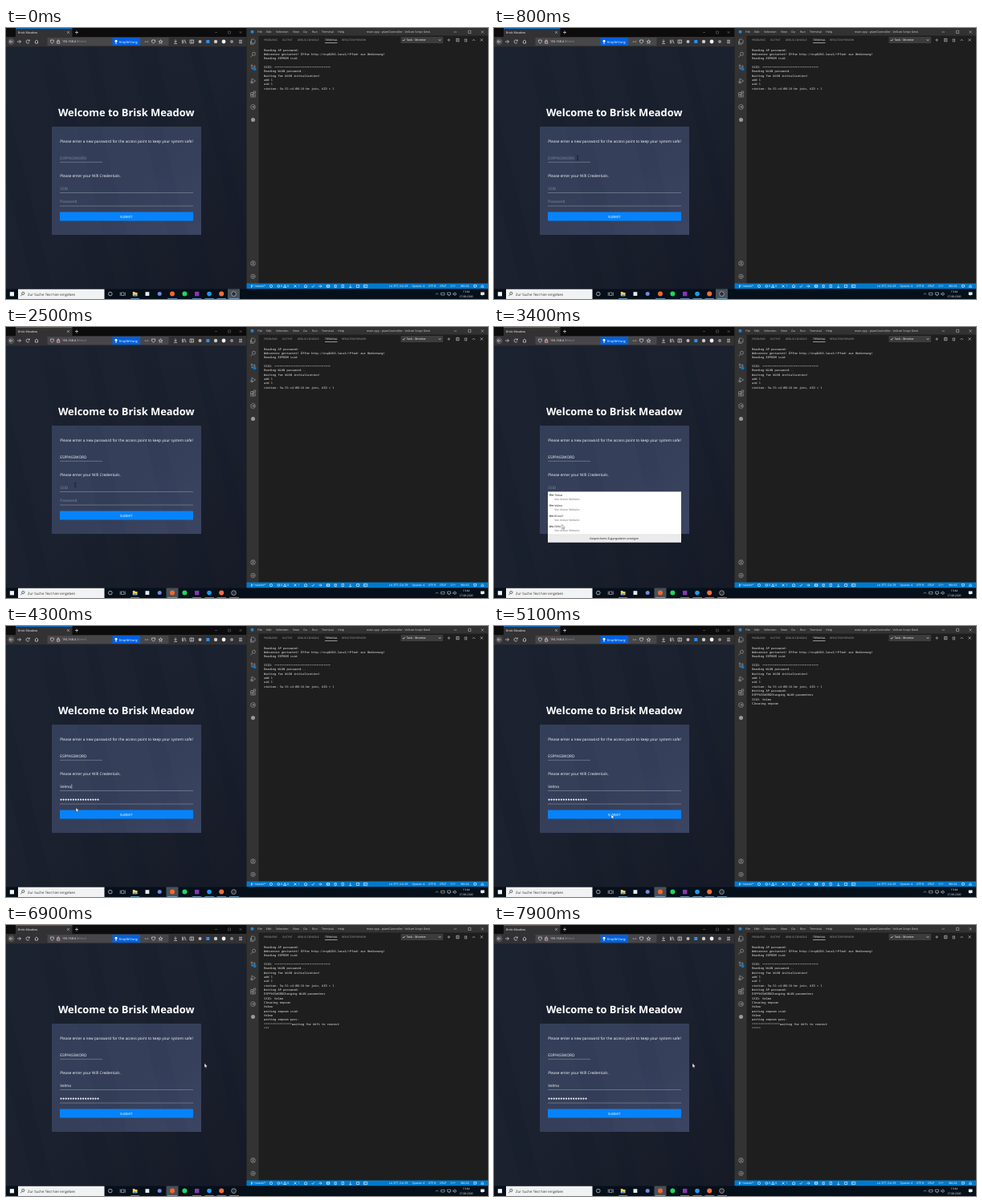
Animation of 600x338 px, one loop 8000 ms. Source, as an HTML page:

```html
<!DOCTYPE html>
<html lang="de">
<head>
<meta charset="utf-8">
<title>Brisk Meadow</title>
<style>
html, body { margin: 0; width: 100%; height: 100%; overflow: hidden; background: #1e1e1e; }
svg { display: block; width: 600px; height: 338px; }
text { font-family: 'Open Sans', 'Noto Sans', sans-serif; text-rendering: geometricPrecision; white-space: pre; }
.mid { text-anchor: middle; }
.form { font-size: 4.73px; fill: #fff; }
.hint { fill: #858da0; }
.menu { font-size: 3.65px; fill: #d2d2d2; }
.tabs { font-size: 3.25px; fill: #a8a8a8; }
.stat { font-size: 3.6px; fill: #fff; }
.list { font-size: 3.5px; fill: #111; }
.list .sub { fill: #666; }
.term text { font: 500 3.65px 'Noto Sans Mono', 'DejaVu Sans Mono', monospace; fill: #ececec; }
.line { fill: none; stroke: #c8c8cc; stroke-width: .8; }

.step { animation: 8s step-end infinite; }
.idle { animation-name: idle; }
.focus { animation-name: focus; }
.pick { animation-name: pick; }
.empty { animation-name: empty; }
.filled { animation-name: filled; }
.logins { animation-name: logins; }
.blank { animation-name: blank; }
.known { animation-name: known; }
.caret { animation-name: caret; }
.log1 { animation-name: log1; }
.log2 { animation-name: log2; }
.cover { animation-name: cover; }
.arrow { animation-name: arrow; }
.beam { animation-name: beam; }
.pointer { animation: move 8s ease-in-out infinite; }

@keyframes idle { 0% { opacity: 1 } 15%, 100% { opacity: 0 } }
@keyframes focus { 0% { opacity: 0 } 15%, 100% { opacity: 1 } }
@keyframes pick { 0% { opacity: 0 } 18.75% { opacity: 1 } 26.25%, 100% { opacity: 0 } }
@keyframes empty { 0% { opacity: 1 } 26.25%, 100% { opacity: 0 } }
@keyframes filled { 0% { opacity: 0 } 26.25%, 100% { opacity: 1 } }
@keyframes logins { 0% { opacity: 0 } 33.75% { opacity: 1 } 48.75%, 100% { opacity: 0 } }
@keyframes blank { 0% { opacity: 1 } 48.75%, 100% { opacity: 0 } }
@keyframes known { 0% { opacity: 0 } 48.75%, 100% { opacity: 1 } }
@keyframes caret { 0% { opacity: 0 } 48.75% { opacity: 1 } 55%, 100% { opacity: 0 } }
@keyframes log1 { 0% { opacity: 0 } 63.75%, 100% { opacity: 1 } }
@keyframes log2 { 0% { opacity: 0 } 65%, 100% { opacity: 1 } }
@keyframes cover {
  0% { transform: none }
  71.25% { transform: translateX(2.19px) }
  77.5% { transform: translateX(4.38px) }
  83.75% { transform: translateX(6.57px) }
  90% { transform: translateX(8.76px) }
  96.25%, 100% { transform: translateX(10.95px) }
}
@keyframes arrow { 0% { opacity: 0 } 1.25% { opacity: 1 } 8.75% { opacity: 0 } 18.75% { opacity: 1 } 30% { opacity: 0 } 33.75%, 100% { opacity: 1 } }
@keyframes beam { 0% { opacity: 0 } 8.75% { opacity: 1 } 18.75% { opacity: 0 } 30% { opacity: 1 } 33.75%, 100% { opacity: 0 } }
@keyframes move {
  0%, 1.25% { transform: translate(283px, 331px) }
  10%, 17.5% { transform: translate(104px, 162px) }
  23.75%, 26.25% { transform: translate(89px, 170.5px) }
  32.5%, 34% { transform: translate(86px, 199px) }
  42.5% { transform: translate(84.5px, 246.5px) }
  48.75% { transform: translate(86px, 225px) }
  53.75% { transform: translate(87px, 226.5px) }
  58.75%, 63.75% { transform: translate(146px, 235px) }
  73.75% { transform: translate(210.5px, 189px) }
  82%, 100% { transform: translate(247px, 172.5px) }
}
</style>
</head>
<body>
<svg viewBox="0 0 600 338">
  <defs>
    <linearGradient id="page" x2="1" y2="1">
      <stop stop-color="#1c2330"/><stop offset=".5" stop-color="#1b212e"/><stop offset="1" stop-color="#161a26"/>
    </linearGradient>
    <linearGradient id="card" x2="1" y2="1">
      <stop stop-color="#333f59"/><stop offset=".55" stop-color="#363f59"/><stop offset="1" stop-color="#3b4562"/>
    </linearGradient>
    <g id="key" fill="none" stroke="#222" stroke-width=".6"><circle r=".9"/><path d="M.9 0H3.600V1M2.600 0V.8"/></g>
  </defs>

  <!-- web page -->
  <path fill="url(#page)" d="M0 23H299.500V326H0Z"/>
  <g fill="#10182a" opacity=".1">
    <path d="M40 23H66L138 326H106ZM98 23H112L180 326H160ZM152 23H186L262 326H226ZM228 23H243L299 250V306Z"/>
    <path d="M0 90L58 326H34L0 190Z"/>
  </g>
  <text class="mid" x="149.700" y="110" font-size="12.9" font-weight="700" fill="#fff">Welcome to Brisk Meadow</text>
  <path fill="url(#card)" d="M57 123H243V258H57Z"/>
  <path fill="#1c2740" opacity=".06" d="M89 123H118L150 258H121ZM170 123H193L226 258H203Z"/>
  <g class="form">
    <text x="67.300" y="142.600">Please enter a new password for the access point to keep your system safe!</text>
    <text x="67.300" y="185.600">Please enter your Wifi Credentials.</text>
    <text class="hint step empty" x="67.300" y="163.900">ESPPASSWORD</text>
    <text class="step filled" x="67.300" y="163.900">ESPPASSWORD</text>
    <g class="hint step blank"><text x="67.300" y="201.900">SSID</text><text x="67.300" y="218.200">Password</text></g>
    <g class="step known">
      <text x="67.300" y="201.900">Velmo</text>
      <path d="M68.500 216.600H116" stroke="#f4f6fa" stroke-width="2.200" stroke-linecap="round" stroke-dasharray="0 3.070"/>
    </g>
    <path class="step caret" d="M81.800 197.500V203" stroke="#fff" stroke-width=".5"/>
  </g>
  <path d="M67 167.300H120M67 205.500H233M67 222H233" stroke="#8c93a3" stroke-width=".6"/>
  <rect x="67" y="229.500" width="166" height="11" rx=".7" fill="#0683fb"/>
  <text class="mid" x="149.700" y="236.700" font-size="4.300" fill="#fff">SUBMIT</text>

  <g class="list step pick">
    <path fill="#fff" stroke="#b9bcc4" stroke-width=".3" d="M67 167.500H120V199H67Z"/>
    <path fill="#0078d7" d="M67 167.500H120V174H67Z"/>
    <text x="69" y="172.200" fill="#fff">ESPPASSWORD</text>
    <text x="69" y="178.800">a</text>
    <text x="69" y="185.100">Wilfram</text>
    <text x="69" y="191.300">asd</text>
    <text x="69" y="197.500">s</text>
  </g>
  <g class="list step logins">
    <path fill="#fff" d="M67 205.500H233V268.500H67Z"/>
    <path fill="#ebebeb" d="M67 258.700H233V268.500H67Z"/>
    <path stroke="#c6c6c6" stroke-width=".3" d="M67 258.700H233"/>
    <use href="#key" x="70.200" y="209.500"/><text x="75.200" y="210.800">Tilmar</text><text class="sub" x="75.200" y="216">Von dieser Website</text>
    <use href="#key" x="70.200" y="222.600"/><text x="75.200" y="223.900">Velmo</text><text class="sub" x="75.200" y="229.100">Von dieser Website</text>
    <use href="#key" x="70.200" y="235.700"/><text x="75.200" y="237">Brinz!!!</text><text class="sub" x="75.200" y="242.200">Von dieser Website</text>
    <use href="#key" x="70.200" y="248.800"/><text x="75.200" y="250.100">Orlin</text><text class="sub" x="75.200" y="255.300">Von dieser Website</text>
    <text class="mid" x="149.500" y="264.900">Gespeicherte Zugangsdaten anzeigen</text>
  </g>

  <!-- browser bars -->
  <path fill="#0c0c0d" d="M0 0H299.500V11H0Z"/>
  <path fill="#323234" d="M12 0H82.500V11H299.500V23.300H0V11H12Z"/>
  <path fill="#0a84ff" d="M12 0H82.500V.8H12Z"/>
  <text x="15" y="7" font-size="3.700" fill="#f4f4f4">Brisk Meadow</text>
  <path class="line" d="M76.300 4.300L78.700 6.700M78.700 4.300L76.300 6.700M86 5.500H90M88 3.500V7.500" stroke-width=".6"/>
  <path fill="none" stroke="#77777a" stroke-width=".5" d="M260 5.500H263M276.500 4H279.500V7H276.500ZM290.500 4L293.500 7M293.500 4L290.500 7"/>
  <circle cx="6.300" cy="17" r="4.200" fill="#505053"/>
  <path class="line" d="M8.500 17H4.300L6.200 15.100M4.300 17L6.200 18.900M14 17H18.500L16.600 15.100M18.500 17L16.600 18.900M29 16A2.100 2.100 0 1 0 29 18M29.300 14.500V16.200H27.700M35.800 17L38 14.900 40.200 17M36.500 16.700V19.100H39.500V16.700"/>
  <rect x="51.500" y="12" width="151" height="10" rx=".7" fill="#474749"/>
  <path class="line" d="M55.500 15H59.300V17.400L57.400 19.400 55.500 17.400ZM63.500 16.800H66.700V19.200H63.500ZM64.100 16.800V15.100H66.100V16.800"/>
  <path stroke="#f0414f" stroke-width=".6" d="M63 19.500L67.200 14.700"/>
  <text x="70" y="18.400" font-size="3.750" fill="#fff">192.168.4.1<tspan fill="#929296">/html</tspan></text>
  <rect x="132.500" y="12" width="34.500" height="10" rx=".8" fill="#0060df"/>
  <circle cx="137" cy="16.300" r="1.500" fill="#fff"/><path fill="#fff" d="M136.200 18.300H137.800V19.500H136.200Z"/>
  <text x="141" y="18.500" font-size="4.050" font-weight="500" fill="#fff">Empfehlung</text>
  <g fill="#d0d0d4"><circle cx="173.200" cy="17" r=".55"/><circle cx="175" cy="17" r=".55"/><circle cx="176.800" cy="17" r=".55"/></g>
  <path class="line" d="M181.500 15H185.500V17.500L183.500 19.200 181.500 17.500ZM192.500 14.700L193.200 16.400 195 16.500 193.600 17.600 194 19.300 192.500 18.400 191 19.300 191.400 17.600 190 16.500 191.800 16.400Z"/>
  <path class="line" d="M211 14.500V18L209.500 16.600M211 18L212.500 16.600M209 19.500H213M219.500 14.700V19.300M221 14.700V19.300M222.500 14.700L224 19.300M229 15H233.500V19H229ZM231.200 15V19M290 15.300H294M290 17H294M290 18.700H294"/>
  <circle cx="241.500" cy="17" r="2" fill="#bcbcc0"/>
  <rect x="249.300" y="15" width="4" height="4" fill="#2b8ef0"/>
  <circle cx="261" cy="17" r="2.200" fill="#c9c9cc"/><circle cx="271" cy="17" r="2.400" fill="#f2f2f2"/><circle cx="281" cy="17" r="2" fill="#8b8b90"/>

  <!-- editor -->
  <path fill="#1e1e1e" d="M299.500 0H600V319H299.500Z"/>
  <path fill="#323233" d="M299.500 0H600V9.400H299.500Z"/>
  <path fill="#333" d="M299.500 9.400H314.500V319H299.500Z"/>
  <circle cx="306.500" cy="4.800" r="2" fill="#2488d3"/>
  <g class="menu">
    <text x="313" y="6.100">File</text><text x="324" y="6.100">Edit</text><text x="336" y="6.100">Selection</text>
    <text x="357" y="6.100">View</text><text x="370" y="6.100">Go</text><text x="381" y="6.100">Run</text>
    <text x="393" y="6.100">Terminal</text><text x="413" y="6.100">Help</text>
    <text class="mid" x="488.500" y="6.100">main.cpp - plantController - Vellum Script Desk</text>
  </g>
  <path class="line" d="M557.500 5H561M575.500 3.300H578.700V6.500H575.500ZM591.500 3.300L594.700 6.500M594.700 3.300L591.500 6.500" style="stroke-width:.5"/>
  <g class="tabs">
    <text x="321" y="16.200">PROBLEMS</text><text x="344" y="16.200">OUTPUT</text><text x="363" y="16.200">DEBUG CONSOLE</text>
    <text x="397" y="16.200" fill="#fff">TERMINAL</text><text x="418" y="16.200">REFACTOR PREVIEW</text>
  </g>
  <path fill="#e7e7e7" d="M397 18.300H412.500V18.900H397Z"/>
  <rect x="491.500" y="11" width="52.500" height="8" fill="#3c3c3c"/>
  <path fill="none" stroke="#eee" stroke-width=".7" d="M493.800 15L494.800 16.100 496.700 13.800M538.700 14.300L540 15.700 541.300 14.300"/>
  <text x="498.500" y="16.400" font-size="3.700" fill="#fff">Task - Monitor</text>
  <path class="line" d="M549.500 15H553M551.200 13.200V16.800M560.500 13.300H564V16.800H560.500ZM562.200 13.300V16.800M570.700 14H574M571.200 14V17H573.500V14M580.500 16L582.200 14.200 584 16M590.500 13.300L593.700 16.500M593.700 13.300L590.500 16.500" style="stroke-width:.6"/>
  <g fill="none" stroke="#8d8d8d" stroke-width=".8">
    <path d="M305.500 14H308.500L310 15.500V19H305.500ZM304.500 16V20.300H308.500"/>
    <circle cx="308.500" cy="32.200" r="2"/><path d="M307 33.700L304.600 36.300"/>
    <circle cx="306" cy="46.800" r=".9"/><circle cx="309.300" cy="47.800" r=".9"/><path d="M306 47.700V51.500M306 50.500Q309.300 50.500 309.300 48.800"/>
    <path d="M306 63L310.500 66 306 69Z"/><circle cx="305.700" cy="67.500" r="1.200"/>
    <path d="M304.700 80.500H307.500V83.300H304.700ZM304.700 83.300H307.500V86H304.700ZM307.500 83.300H310.300V86H307.500ZM308.200 79H310.700V81.500H308.200Z"/>
    <circle cx="307.500" cy="98.500" r="2.900"/><path d="M306 98.500H309M308 97L309.300 98.500 308 100"/>
    <circle cx="307.500" cy="293.500" r="2.900"/><circle cx="307.500" cy="292.700" r="1"/><path d="M305.500 295.500Q307.500 293.200 309.500 295.500"/>
    <circle cx="307.500" cy="309.800" r="1"/><circle cx="307.500" cy="309.800" r="2.600" stroke-dasharray="1.360 .68" stroke-width="1.100"/>
  </g>
  <circle cx="309.500" cy="51.200" r="2.100" fill="#007acc"/>
  <circle cx="307.500" cy="114.500" r="2.500" fill="#9a9a9a"/>

  <g class="term">
    <text x="321" y="28.800">Reading AP password:</text>
    <text x="321" y="34.100">Webserver gestartet! Öffne http://esp8266.local/&lt;Pfad&gt; zur Bedienung!</text>
    <text x="321" y="39.400">Reading EEPROM ssid</text>
    <text x="321" y="50.100">SSID: <tspan font-weight="700">••••••••••••••••••••••••••••••••</tspan></text>
    <text x="321" y="55.400">Reading WLAN password...</text>
    <text x="321" y="60.700">Waiting for WLAN initialization!</text>
    <text x="321" y="66">add 1</text>
    <text x="321" y="71.400">aid 1</text>
    <text x="321" y="76.700">station: 5a:31:c4:00:16:be join, AID = 1</text>
    <g class="step log1">
      <text x="321" y="82">Writing AP password:</text>
      <text x="321" y="87.300">ESPPASSWORDChanging WLAN parameters</text>
      <text x="321" y="92.600">SSID: Velmo</text>
      <text x="321" y="98">Clearing eeprom</text>
    </g>
    <g class="step log2">
      <text x="321" y="103.300">Velmo</text>
      <text x="321" y="108.600">writing eeprom ssid:</text>
      <text x="321" y="113.900">Velmo</text>
      <text x="321" y="119.200">writing eeprom pass:</text>
      <text x="321" y="124.600">****************waiting for Wifi to connect</text>
    </g>
    <text x="321" y="129.900">*****</text>
    <path class="step cover" fill="#1e1e1e" d="M321 126H333V132H321Z"/>
  </g>

  <path fill="#007acc" d="M299.500 318.500H600V325.500H299.500Z"/>
  <g class="stat">
    <text x="309.500" y="323.300">master*</text><text x="342" y="323.300">0</text><text x="350" y="323.300">0</text><text x="363.500" y="323.300">1</text>
    <text x="477" y="323.300">Ln 377, Col 29</text><text x="505.500" y="323.300">Spaces: 4</text><text x="525.500" y="323.300">UTF-8</text>
    <text x="540" y="323.300">CRLF</text><text x="553.500" y="323.300">C++</text><text x="566" y="323.300">Win32</text>
  </g>
  <g fill="none" stroke="#fff" stroke-width=".6">
    <path d="M305.500 320.200V323.800M307.500 320.500Q307.500 322.300 305.500 322.500M345.500 323.500L347.200 320.300 348.900 323.500ZM358.500 320.500L361.500 323.500M361.500 320.500L358.500 323.500"/>
    <circle cx="330" cy="322" r="1.600"/><circle cx="339.300" cy="322" r="1.400"/>
    <path d="M371 322L373 320.200 375 322M371.700 321.600V323.700H374.300V321.600M380.500 322L381.700 323.300 384 320.500M389 322H393M391.500 320.500L393 322 391.500 323.500M399.500 320.500H402.500V323.500H399.500ZM398.500 322H403.500"/>
    <path d="M408.500 320.800H411.700M409 320.800V323.700H411.200V320.800M418 320.300H420.300V323.700H418ZM427 323.700H430.500M428.700 320.300V323.500M436.500 320.500H439.500V323.500H436.500ZM445.500 320.300H449.500V323.700H445.500ZM446.500 321.300L447.500 322 446.500 322.700"/>
    <path d="M582.500 320.500H585.500V322.800H584L583.300 323.700V322.800H582.500ZM591.300 323.200H594.700L594 322.300V321.300Q593 319.300 592 321.300V322.300Z"/>
  </g>

  <!-- taskbar -->
  <path fill="#06101a" d="M0 325.500H600V338H0Z"/>
  <rect x="4.800" y="329.200" width="5.200" height="5.200" fill="#f4f4f4"/>
  <path fill="#f1f2f3" d="M15 325.800H122.500V338H15Z"/>
  <g fill="none" stroke="#333" stroke-width=".7"><circle cx="21.300" cy="331" r="1.600"/><path d="M20.200 332.200L18.300 334.200"/></g>
  <text x="27" y="333.500" font-size="4.400" fill="#333">Zur Suche Text hier eingeben</text>
  <path class="step idle" fill="#46515a" d="M276 325.500H291V338H276Z"/>
  <path class="step focus" fill="#46515a" d="M199.500 325.500H214.500V338H199.500Z"/>
  <circle class="line" cx="129.800" cy="331.600" r="2.300"/>
  <path class="line" d="M143.500 330H147V333.500H143.500ZM148.300 329.500V334M142.200 329.500V334" style="stroke-width:.6"/>
  <path fill="#f7cf58" d="M157.800 329H160L161 330H163.500V334.300H157.800Z"/><path fill="#3b9be0" d="M159 332.400H162.300V334.300H159Z"/>
  <rect x="173.500" y="329.200" width="4.800" height="4.800" fill="#dfeaf2"/>
  <circle cx="191.200" cy="331.600" r="2.500" fill="#7289da"/>
  <circle cx="207" cy="331.600" r="3" fill="#f5672a"/>
  <circle cx="222.400" cy="331.600" r="3" fill="#1ed760"/>
  <rect x="235" y="328.900" width="5.400" height="5.400" fill="#8a35b3"/>
  <circle cx="253" cy="331.600" r="2.800" fill="#219be8"/>
  <circle cx="268.200" cy="331.600" r="3" fill="#ff6c37"/>
  <circle cx="283.500" cy="331.600" r="2.900" fill="#2d2d31" stroke="#d3d3d5" stroke-width=".6"/>
  <path stroke="#76b9ed" stroke-width=".7" d="M155 337.500H166M201 337.500H213M232 337.500H243M247.500 337.500H259M262.500 337.500H274M278 337.500H290"/>
  <path class="line" d="M534.800 332.500L536.500 330.800 538.200 332.500M541.500 330.300H546V333H541.500ZM549.500 330H553.500V332.700H549.500ZM550.500 333.700H552.500M556.500 331H557.500L559 329.700V333.700L557.500 332.400H556.500ZM560 330.500Q561 331.700 560 333" style="stroke-width:.6"/>
  <g class="mid" font-size="3.300" fill="#fff"><text x="573" y="330.200">13:44</text><text x="573" y="336">27.08.2020</text></g>
  <path fill="#f2f2f2" d="M590.800 329.500H595.500V333H593.500L592.500 334.200V333H590.800Z"/>

  <g class="pointer">
    <path class="step arrow" d="M0 0V5.300L1.300 4.200 2.100 6 3 5.600 2.200 3.900H3.900Z" fill="#fff" stroke="#000" stroke-width=".35"/>
    <path class="step beam" d="M-1-2.600H-.3L0-2.300.3-2.600H1M0-2.300V2.300M-1 2.600H-.3L0 2.300.3 2.600H1" fill="none" stroke="#0c0f16" stroke-width=".6"/>
  </g>
</svg>
</body>
</html>
```
